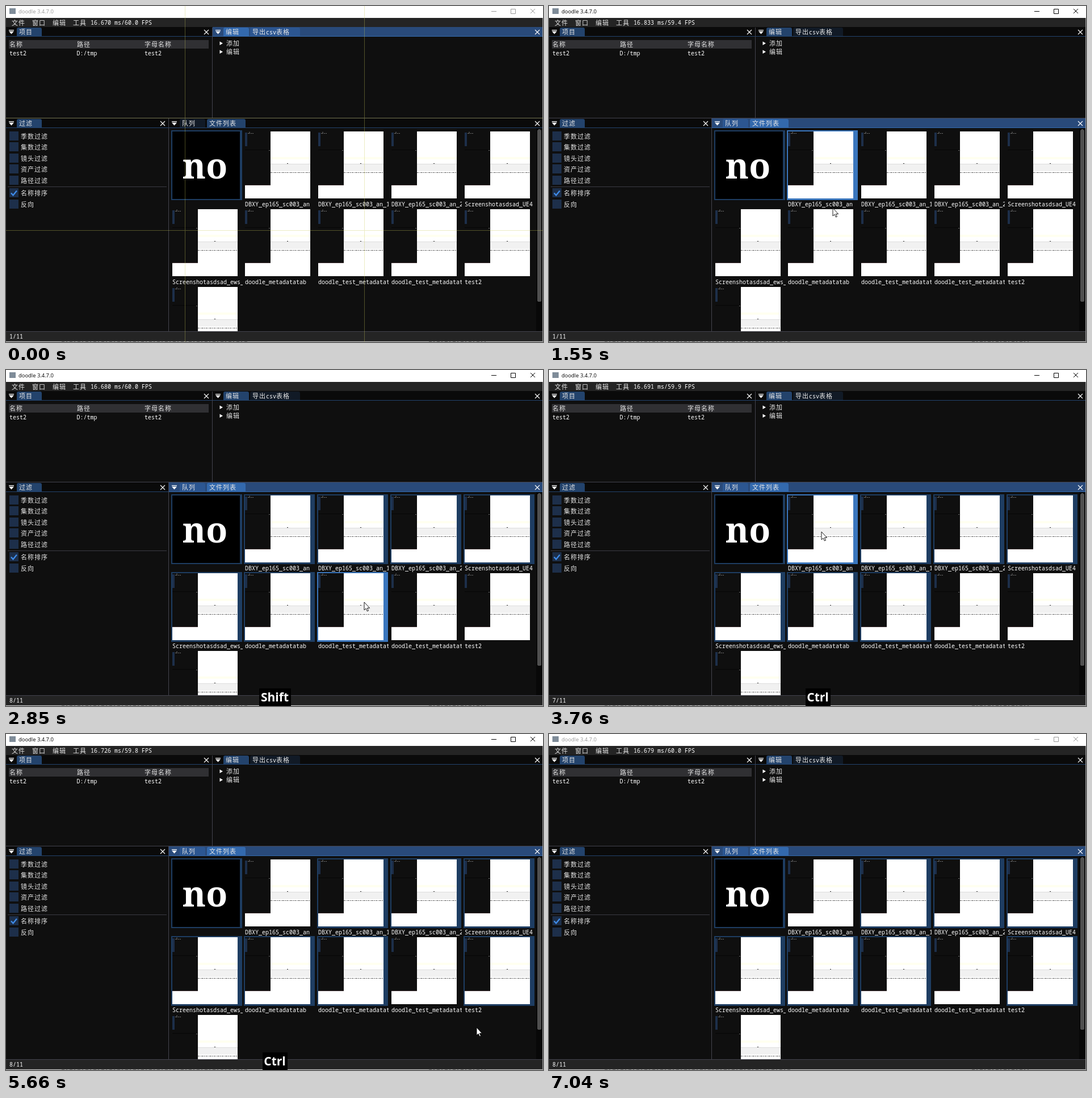
Animation of 946x592 px, one loop 7.12 s. Source, as an HTML page:

```html
<!DOCTYPE html>
<html lang="zh">
<head>
<meta charset="utf-8">
<title>doodle</title>
<style>
html, body { margin: 0; width: 100%; height: 100%; overflow: hidden; background: #0f0f0f; }
svg { display: block; }
rect { shape-rendering: crispEdges; }
text { fill: #fff; white-space: pre; }
.latin { font: 10px "Noto Sans Mono", "Liberation Mono", monospace; }
.cjk { font: 300 11px "Noto Sans CJK SC", "Noto Sans CJK", "Noto Sans CJK JP", sans-serif; letter-spacing: 1px; fill: #e6e6e6; }
.caption { font: 9.4px "Open Sans", sans-serif; fill: #999; }
.key { font: 700 21px "Open Sans", sans-serif; text-anchor: middle; }
.no { font: 700 62px "Noto Serif", serif; text-anchor: middle; filter: blur(.6px); }
.line { fill: none; stroke: #fff; stroke-width: 1.1; }
.buttons { fill: none; stroke: #999; }
.bar { fill: #0a0a0a; }
.tab { fill: #111a26; }
.tab.on, .under { fill: #23436c; }
.focus .bar { fill: #294a7a; }
.focus .tab { fill: #2c5691; }
.focus .tab.on, .focus .under { fill: #3369ad; }
.active .caption { fill: #000; }
.active .buttons { stroke: #000; }
.frame { fill: none; }
.picked { fill: #1e3d62; }
.hover { fill: #3a76bd; }
</style>
</head>
<body>
<svg id="stage" width="946" height="592" viewBox="0 0 946 592" xmlns="http://www.w3.org/2000/svg">
  <defs>
    <g id="thumb">
      <rect width="115" height="118" fill="#fff"/>
      <rect width="45" height="95" fill="#0f0f0f"/>
      <rect y="94" width="45" height="1" fill="#3a2c2e"/>
      <rect y="2" width="4" height="24" fill="#1d2f4a"/>
      <path d="M5 3.5h4m1 0h2m1 0h2M7 1.5h2" stroke="#8a8a8a" stroke-width=".8"/>
      <rect y="32" width="45" height="1" fill="#060606"/>
      <rect x="42" y="33" width="2" height="1" fill="#777"/>
      <rect x="45" y="45" width="70" height="4" fill="#fffff0"/>
      <rect x="45" y="57" width="70" height="13" fill="#f1f1f1"/>
      <rect x="45" y="57" width="70" height="1" fill="#ddd"/>
      <rect x="74" y="56" width="2" height="1" fill="#333"/>
      <path d="M45 72.5h70" stroke="#666" stroke-dasharray="3 1 1 1 4 1 2 1"/>
    </g>
  </defs>
  <g id="ui"></g>
  <g id="guides" fill="#c8c85a" opacity=".36">
    <rect x="315" width="1" height="592"/>
    <rect x="631" width="1" height="592"/>
    <rect y="197" width="946" height="1"/>
    <rect y="395" width="946" height="1"/>
  </g>
  <g id="key">
    <rect id="keyBox" y="561" height="31"/>
    <text id="keyText" class="key" x="473.5" y="584"></text>
  </g>
  <path id="cursor" d="M0 0V14L3.1 11.2 5.4 16 7.5 15 5.3 10.4H9.6Z" fill="#fff" stroke="#000" stroke-width=".9"/>
</svg>
<script>
const LOOP = 7120, LAG = 95;
const $ = id => document.getElementById(id);

const rect = (x, y, w, h, fill, extra = '') =>
  `<rect x="${x}" y="${y}" width="${w}" height="${h}" ${fill ? `fill="${fill}"` : ''} ${extra}/>`;

// Latin and CJK runs differ in size so that one ideograph spans two Latin cells
const label = (x, mid, str) => {
  const runs = str.match(/[\u4e00-\u9fff]+|[^\u4e00-\u9fff]+/g);
  const spans = runs.map(r => `<tspan class="${r > '\u4e00' ? 'cjk' : 'latin'}">${r}</tspan>`);
  return `<text x="${x}" y="${mid + 4}">${spans.join('')}</text>`;
};

const panel = (id, x, y, w, tabs) => {
  const mid = y + 9, cx = x + w - 10;
  const parts = tabs.map(([tx, tw, name, on]) =>
    `<path class="tab ${on ? 'on' : ''}" d="M${tx} ${y + 17}v-13q0-3 3-3h${tw - 6}q3 0 3 3v13z"/>` + label(tx + 4, mid, name));
  return `<g id="${id}">${rect(x, y, w, 17, '', 'class="bar"')}${parts.join('')}
    ${rect(x, y + 16, w, 1, '', 'class="under"')}
    <path d="M${x + 5} ${mid - 4}h9v1.3h-9zM${x + 5} ${mid - 1.6}h9l-4.5 5.2z" fill="#fff"/>
    <path class="line" d="M${cx - 4} ${mid - 4}l8 8m0 -8l-8 8"/></g>`;
};

const names = ['', 'DBXY_ep165_sc003_an', 'DBXY_ep165_sc003_an_1', 'DBXY_ep165_sc003_an_2', 'Screenshotasdsad_UE4',
  'Screenshotasdsad_ews_', 'doodle_metadatatab', 'doodle_test_metadatatab', 'doodle_test_metadatatab', 'test2', ''];
const cells = names.map((name, i) => ({
  name, x: Math.round(290.6 + 128.8 * (i % 5)), y: 219 + 137 * Math.floor(i / 5)
}));

const fileItem = ({ name, x, y }, i) => {
  const image = i ? `<use href="#thumb" x="${x + 2}" y="${y + 2}"/>`
    : rect(x + 2, y + 2, 119, 119, '#000') + `<text class="no" x="${x + 59.5}" y="304">no</text>`;
  const text = name && `<svg x="${x + 2}" y="${y + 122}" width="124" height="16">${label(0, 8, name)}</svg>`;
  return rect(x, y, 125, 123, '', 'class="frame"') + image + text;
};

const checks = [['季数过滤', 229], ['集数过滤', 248], ['镜头过滤', 268], ['资产过滤', 287], ['路径过滤', 307], ['名称排序', 329], ['反向', 349]];

$('ui').innerHTML = [
  rect(0, 0, 946, 21, '#fff'),
  rect(6, 4, 11, 10, '#7f8c99'),
  '<text class="caption" x="22" y="13">doodle 3.4.7.0</text>',
  '<path class="buttons" d="M855 9.5h9M889.5 5.5h8v8h-8zM924 5l8 8m0-8l-8 8"/>',
  rect(0, 21, 946, 16, '#242424'),
  label(10, 29.5, '文件'), label(46, 29.5, '窗口'), label(82, 29.5, '编辑'), label(118, 29.5, '工具'),
  '<text id="fps" class="latin" x="149" y="33"></text>',

  panel('project', 0, 37, 363, [[19, 44, '项目', 1]]),
  rect(5, 60, 352, 15, '#303033'),
  label(6, 67.5, '名称'), label(125, 67.5, '路径'), label(244, 67.5, '字母名称'),
  label(6, 83, 'test2'), label(124.5, 83, 'D:/tmp'), label(244, 83, 'test2'),

  panel('edit', 364, 37, 582, [[383, 45, '编辑', 1], [430, 88, '导出csv表格', 0]]),
  '<path d="M376.500 62.500v6.500l5.500-3.250zM376.500 77.500v6.500l5.500-3.250z" fill="#fff"/>',
  label(388, 65.5, '添加'), label(388, 81, '编辑'),

  rect(0, 197, 946, 1, '#43434d'),
  panel('filter', 0, 198, 286, [[19, 44, '过滤', 1]]),
  ...checks.map(([name, mid]) => rect(6, mid - 8, 16, 16, '#1d2f4a') + label(26, mid + .5, name)),
  '<path d="M9 329.500l3.500 4 6.500-8" fill="none" stroke="#3f8cea" stroke-width="2.300"/>',
  rect(3, 318, 280, 1, '#3b3b43'),

  panel('files', 287, 198, 659, [[306, 45, '队列', 0], [354, 68, '文件列表', 1]]),
  '<svg width="946" height="573"><g id="items">', ...cells.map(fileItem), '</g></svg>',
  rect(934, 215, 11, 358, '#080808'),
  '<rect x="936" y="217" width="7" height="304" rx="3.500" fill="#4f4f4f"/>',

  rect(363, 38, 1, 160, '#43434d'), rect(286, 198, 1, 376, '#43434d'),
  rect(0, 573, 946, 1, '#43434d'),
  rect(0, 574, 946, 16, '#242424'),
  '<text id="count" class="latin" x="6" y="586"></text>',
  rect(0, 590, 946, 1, '#3a3a3a'), rect(0, 591, 946, 1, '#ccc'), rect(945, 21, 1, 571, '#999'),
  '<path d="M98 591.500h330M745 591.500h100" stroke="#888" stroke-dasharray="5 3 2 4"/>'
].join('');

const frames = [...document.querySelectorAll('.frame')];

// [time, x, y]
const path = [[420, 470, 594], [700, 372, 330], [890, 355, 281], [1150, 355, 281], [1500, 490, 338], [1550, 500, 356],
  [1630, 500, 356], [1900, 540, 380], [2300, 629, 406], [2680, 631, 409], [3190, 631, 409], [3680, 480, 285],
  [3930, 480, 285], [4300, 640, 395], [4580, 780, 415], [4660, 814, 421], [4740, 814, 421], [4950, 870, 432],
  [5330, 866, 440], [5540, 833, 508], [5660, 829, 517], [5740, 829, 517], [6140, 780, 505], [6870, 660, 596]];
// [time, milliseconds per frame]
const pace = [[0, 16.670], [420, 16.674], [820, 16.832], [1550, 16.833], [1640, 16.833], [2600, 16.680], [2940, 16.680],
  [4660, 16.702], [4740, 16.702], [5660, 16.726], [5740, 16.726], [6950, 16.679]];

const sample = (keys, t) => {
  const next = keys.findIndex(k => k[0] > t);
  if (next < 1) return (next ? keys[keys.length - 1] : keys[0]).slice(1);
  const a = keys[next - 1], b = keys[next], u = (t - a[0]) / (b[0] - a[0]);
  return a.slice(1).map((v, i) => v + (b[i + 1] - v) * u);
};

const hit = ([px, py]) => cells.findIndex(({ x, y }) => px >= x && px <= x + 125 && py >= y && py <= y + 123);

const isPicked = (i, t) => i === 0
  || i === 1 && t >= 2430 && t < 3760
  || i > 1 && i < 8 && t >= 2430
  || i === 9 && t >= 5080;

const show = (el, on) => { el.style.display = on ? '' : 'none'; };

function draw(t) {
  const [ms] = sample(pace, t);
  $('fps').textContent = `${ms.toFixed(3)} ms/${(1000 / ms).toFixed(1)} FPS`;

  $('stage').classList.toggle('active', t >= 1070 && t < 6950);
  $('edit').classList.toggle('focus', t < 1150);
  $('files').classList.toggle('focus', t >= 1150);
  show($('guides'), t < 80);

  const present = t >= 420 && t < 6870;
  const [x, y] = sample(path, t).map(Math.round);
  show($('cursor'), present);
  $('cursor').setAttribute('transform', `translate(${x} ${y})`);

  const over = present ? hit(sample(path, t - LAG)) : -1;
  let count = 0;
  frames.forEach((el, i) => {
    const picked = isPicked(i, t);
    count += picked;
    el.setAttribute('class', 'frame' + (i === over ? ' hover' : picked ? ' picked' : ''));
  });
  $('count').textContent = `${count}/${cells.length}`;

  const key = t >= 1710 && t < 2940 ? 'Shift' : t >= 3300 && t < 6500 ? 'Ctrl' : '';
  const width = key === 'Shift' ? 56 : 44;
  show($('key'), key);
  $('keyText').textContent = key;
  $('keyBox').setAttribute('x', 473.5 - width / 2);
  $('keyBox').setAttribute('width', width);
}

const start = performance.now();
function tick() {
  draw((performance.now() - start) % LOOP);
  requestAnimationFrame(tick);
}
tick();
</script>
</body>
</html>
```
